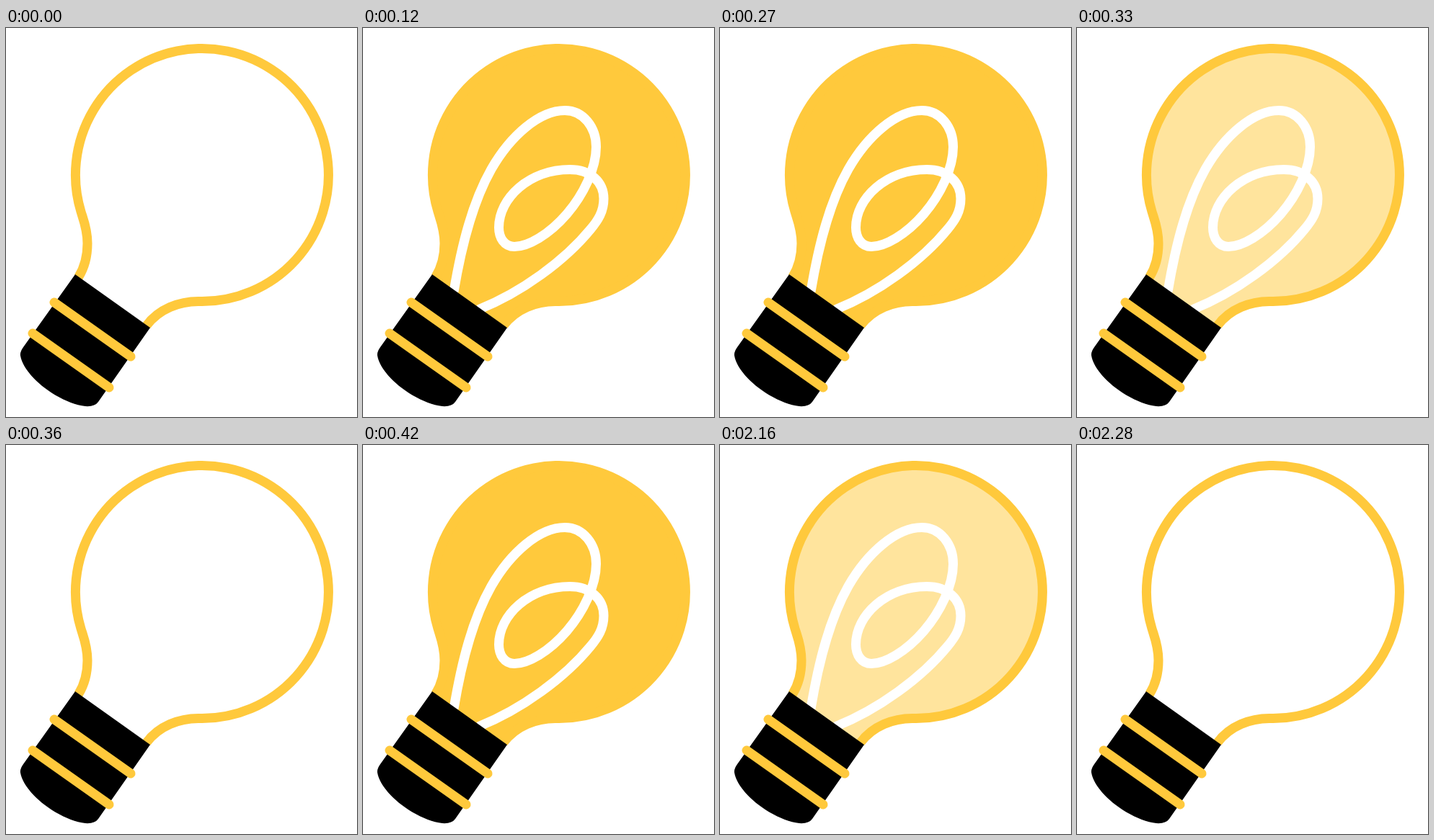
These frames come from a looping animation (487x540 px, 2.7 s). An HTML page:

```html
<!DOCTYPE html>
<html lang="en">
<head>
<meta charset="utf-8">
<title>Light bulb</title>
<style>
  html, body { margin: 0; width: 100%; height: 100%; overflow: hidden; background: #fff; }
  svg { display: block; width: 100%; height: 100%; }
  .line { fill: none; stroke: #ffc93c; stroke-width: 13; }
  .wire { stroke: #fff; }
  .bands { stroke-linecap: round; }
  .glow { opacity: 0; animation: flicker 2700ms step-end infinite; }

  /* one percent of the loop is 27 ms */
  @keyframes flicker {
    0% { opacity: 0; }
    4.444% { opacity: 1; }
    5.555% { opacity: .5; }
    6.666% { opacity: 0; }
    7.777% { opacity: .33; }
    8.888% { opacity: .67; }
    10% { opacity: 1; }
    12.222% { opacity: .5; }
    13.333% { opacity: 0; }
    14.444% { opacity: .5; }
    15.555% { opacity: 1; }
    77.777% { opacity: .5; }
    78.888% { opacity: 0; }
    80% { opacity: .5; }
    81.111% { opacity: 1; }
    83.333% { opacity: .5; }
    84.444%, 100% { opacity: 0; }
  }
</style>
</head>
<body>
<svg viewBox="0 0 487 540">
  <defs>
    <path id="glass" d="M100.5 346C108 334 113 317 113 299C113 279 107 265 104 255A175.5 175.5 0 1 1 272 379.5C240 378 211 391 195 413"/>
  </defs>
  <g class="glow">
    <use href="#glass" fill="#ffc93c"/>
    <path class="line wire" d="M126 366C137 300 152 242 178 196C205 149 245 114.5 280 114.5C306 114.5 323.5 138 323.5 165C323.5 195 306 231 283 258C258 287 229 303.5 210 303.5C196 303.5 188.5 291 188.5 277C188.5 236 231 196.5 287 196.5C316 196.5 334 214 334 237C334 255 326 267 316 279C280 323 220 367 160 391"/>
  </g>
  <use href="#glass" class="line"/>
  <path d="M96 342L200 416L128 519Q123 526 110 525C74 521 25 484 20 455Q19 450 24 443Z"/>
  <path class="line bands" d="M67 381L173 456M37 424L143 499"/>
</svg>
</body>
</html>
```
